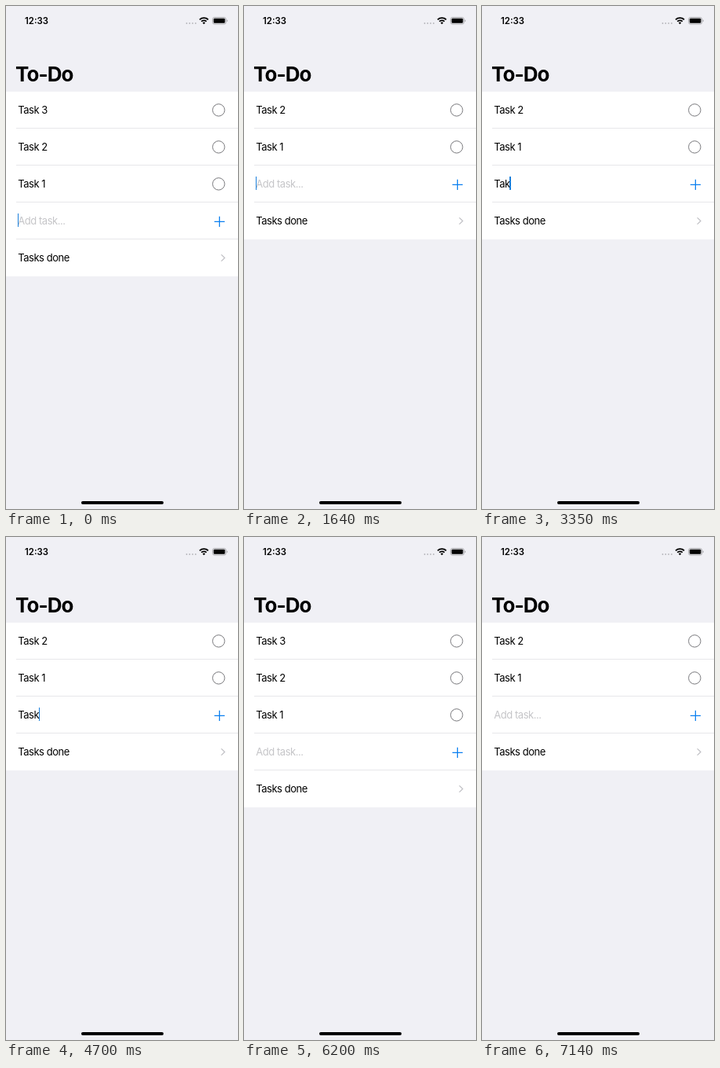
An HTML page for the animation above (8 s loop, 296 by 640 pixels).

```html
<!DOCTYPE html>
<html lang="en">
<head>
<meta charset="utf-8">
<title>To-Do</title>
<style>
  html, body { margin: 0; width: 100%; height: 100%; overflow: hidden; }
  body {
    position: relative;
    background: #f0f0f5;
    color: #000;
    font: 400 13px/47px Inter, "Liberation Sans", sans-serif;
    letter-spacing: -.45px;
  }
  svg { position: absolute; left: 0; top: 0; fill: none; }
  h1 {
    position: absolute; left: 12px; top: 67px; margin: 0;
    font-size: 26px; line-height: 40px; font-weight: 700; letter-spacing: -.9px;
  }
  .clock {
    position: absolute; left: 24px; top: 9px;
    font-size: 11.4px; line-height: 20px; font-weight: 600; letter-spacing: 0;
  }
  .row {
    position: relative; box-sizing: border-box;
    width: 296px; height: 47px; padding-left: 15.2px;
    background: #fff; white-space: pre;
  }
  .row::after {
    content: ""; position: absolute; left: 13px; right: 0; bottom: 0;
    height: 1px; background: #e7e7ea;
  }
  .row:last-child { height: 46.5px; }
  .row:last-child::after { display: none; }
  .list { position: absolute; left: 0; top: 109px; }
  .stack { position: absolute; left: 0; top: 0; }
  .field { position: relative; }
  .hint { color: #c5c5c8; }
  .caret {
    position: absolute; left: 100%; top: -1px; margin-left: -.4px;
    width: 1.6px; height: 17px; background: #1a7fdb;
  }
  .home {
    position: absolute; left: 95.5px; top: 630px;
    width: 105px; height: 4px; border-radius: 2px; background: #000;
  }
  .circle { stroke: #77777b; stroke-width: 1; }
  .plus { stroke: #0a7ff0; stroke-width: 1.3; }
  .chevron { stroke: #c2c2c6; stroke-width: 1.3; stroke-linecap: round; stroke-linejoin: round; }
</style>
</head>
<body>
  <svg width="296" height="40">
    <g fill="#b4b4b9">
      <circle cx="230.5" cy="22" r=".9"/><circle cx="234.3" cy="22" r=".9"/>
      <circle cx="238.1" cy="22" r=".9"/><circle cx="241.9" cy="22" r=".9"/>
    </g>
    <g stroke="#000" stroke-width="1.8">
      <path d="M247 17.3a8 8 0 0 1 11 0M249.2 19.7a4.9 4.9 0 0 1 6.6 0"/>
      <path d="M252.5 23.2l-1.8-1.9a2.7 2.7 0 0 1 3.6 0z" fill="#000" stroke="none"/>
    </g>
    <rect x="263.5" y="14.5" width="17.2" height="8.6" rx="2.5" stroke="#a5a5a9" stroke-width=".9"/>
    <rect x="264.8" y="15.8" width="14.6" height="6" rx="1.4" fill="#000"/>
    <path d="M281.6 17.3q1.2.4 1.2 1.5t-1.2 1.5z" fill="#a5a5a9"/>
  </svg>
  <div class="clock">12:33</div>
  <h1>To-Do</h1>

  <div class="list">
    <div class="row" id="newest">Task 3<svg width="296" height="47"><circle class="circle" cx="271.3" cy="23.4" r="7.7"/></svg></div>
    <div class="stack" id="stack">
      <div class="row">Task 2<svg width="296" height="47"><circle class="circle" cx="271.3" cy="23.4" r="7.7"/></svg></div>
      <div class="row">Task 1<svg width="296" height="47"><circle class="circle" cx="271.3" cy="23.4" r="7.7"/></svg></div>
      <div class="row"><span class="field"><span id="typed"></span><i class="caret" id="caret"></i></span><span class="hint" id="hint">Add task...</span><svg width="296" height="47"><path class="plus" d="M265.8 24.4h13.2M272.4 17.8v13.2"/></svg></div>
      <div class="row">Tasks done<svg width="296" height="47"><path class="chevron" d="M275 19.6l4 3.9-4 3.9"/></svg></div>
    </div>
  </div>
  <div class="home"></div>

<script>
  const LOOP = 8000, ROW = 47;
  const byId = id => document.getElementById(id);
  const [newest, stack, typed, caret, hint] =
    ["newest", "stack", "typed", "caret", "hint"].map(byId);

  // [time, value] pairs; each value holds until the next time.
  const TYPING = [[0, ""], [3030, "T"], [3200, "Ta"], [3350, "Tak"], [4220, "Ta"],
    [4490, "Tas"], [4700, "Task"], [5020, "Task "], [5220, "Task 3"], [5790, ""]];
  const BLINK = [[0, 1], [540, .5], [660, 0], [900, .5], [1020, 1],
    [2140, .5], [2260, 0], [2500, .5], [2620, 1], [3980, 0], [4220, 1], [5790, 0]];

  // The screen updates in steps while rows slide.
  const SLIDES = [
    { from: 1, to: 0, start: 1310, length: 320, first: 1320, step: 106 },
    { from: 0, to: 1, start: 5687, length: 310, first: 5790, step: 105 },
    { from: 1, to: 0, start: 6810, length: 320, first: 6820, step: 106 },
  ];

  const held = (track, t) => track.findLast(([time]) => time <= t)[1];
  const ease = x => x * x * (3 - 2 * x);

  function openness(t) {
    const slide = SLIDES.findLast(s => s.first <= t);
    if (!slide) return 1;
    const { from, to, start, length, first, step } = slide;
    const shown = first + Math.floor((t - first) / step) * step;
    const x = Math.min(1, (shown - start) / length);
    return from + (to - from) * ease(x);
  }

  function draw(t) {
    const open = openness(t), text = held(TYPING, t);
    stack.style.transform = `translateY(${open * ROW}px)`;
    newest.style.visibility = open ? "visible" : "hidden";
    typed.textContent = text;
    hint.hidden = text !== "";
    caret.style.opacity = held(BLINK, t);
  }

  const began = performance.now();
  function tick() {
    draw((performance.now() - began) % LOOP);
    requestAnimationFrame(tick);
  }
  tick();
</script>
</body>
</html>
```
